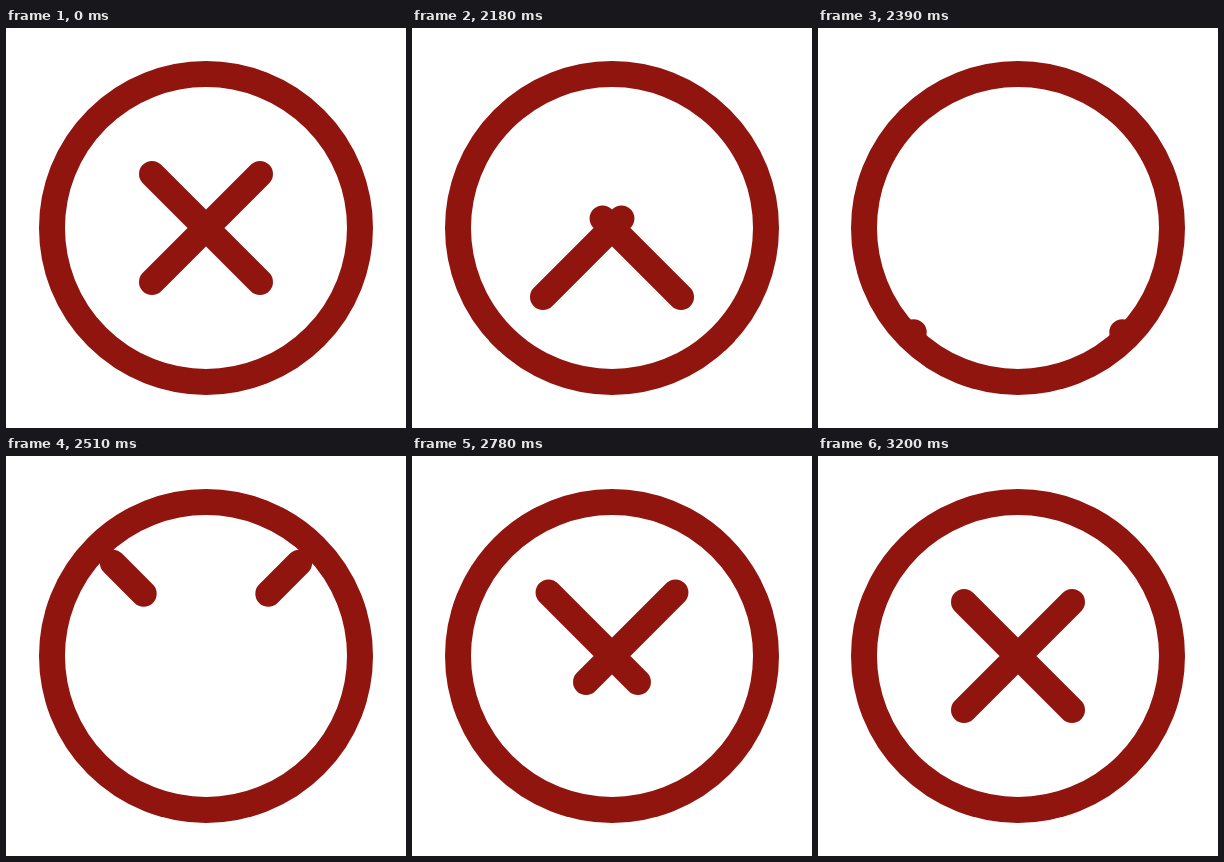
Write an HTML page that moves like this. It is 400 px wide and 400 px high and loops after 3230 ms.

```html
<!DOCTYPE html>
<html lang="en">
<head>
<meta charset="utf-8">
<title>Close icon</title>
<style>
  html, body { margin: 0; height: 100%; overflow: hidden; background: #fff; }
  svg { display: block; width: 100%; height: 100%; }
</style>
</head>
<body>
<svg viewBox="-200 -200 400 400" fill="none" stroke="#90150f" stroke-width="26" stroke-linecap="round">
  <circle r="154"/>
  <path id="cross"/>
</svg>
<script>
const LOOP = 3230, HOLD = 2030, STEP = 30;
const EXIT = 2050, ENTER = 2425, EXIT_MS = 378, ENTER_MS = 800;
const ARM = 54;    // half extent of the resting cross
const RIM = 108.9; // diagonal point on the ring's centre line
const cross = document.getElementById('cross');

const clamp = x => Math.min(1, Math.max(0, x));
const mix = (a, b, p) => a + (b - a) * p;
const smooth = x => x * x * (3 - 2 * x);
const easeOut = x => 1 - (1 - x) ** 3;

// Both ends of the strokes, measured down from the centre
function strokeEnds(t) {
  if (t < HOLD) return [-ARM, ARM];
  t -= (t - HOLD) % STEP;
  if (t < ENTER) {
    const p = smooth(clamp((t - EXIT) / EXIT_MS));
    return [mix(-ARM, RIM, p), mix(ARM, RIM, p)];
  }
  const p = easeOut(clamp((t - ENTER) / ENTER_MS));
  return [mix(-RIM, -ARM, p), mix(-RIM, ARM, p)];
}

function draw() {
  const [a, b] = strokeEnds(performance.now() % LOOP);
  cross.setAttribute('d', `M${a} ${a}L${b} ${b}M${-a} ${a}L${-b} ${b}`);
  requestAnimationFrame(draw);
}
draw();
</script>
</body>
</html>
```
